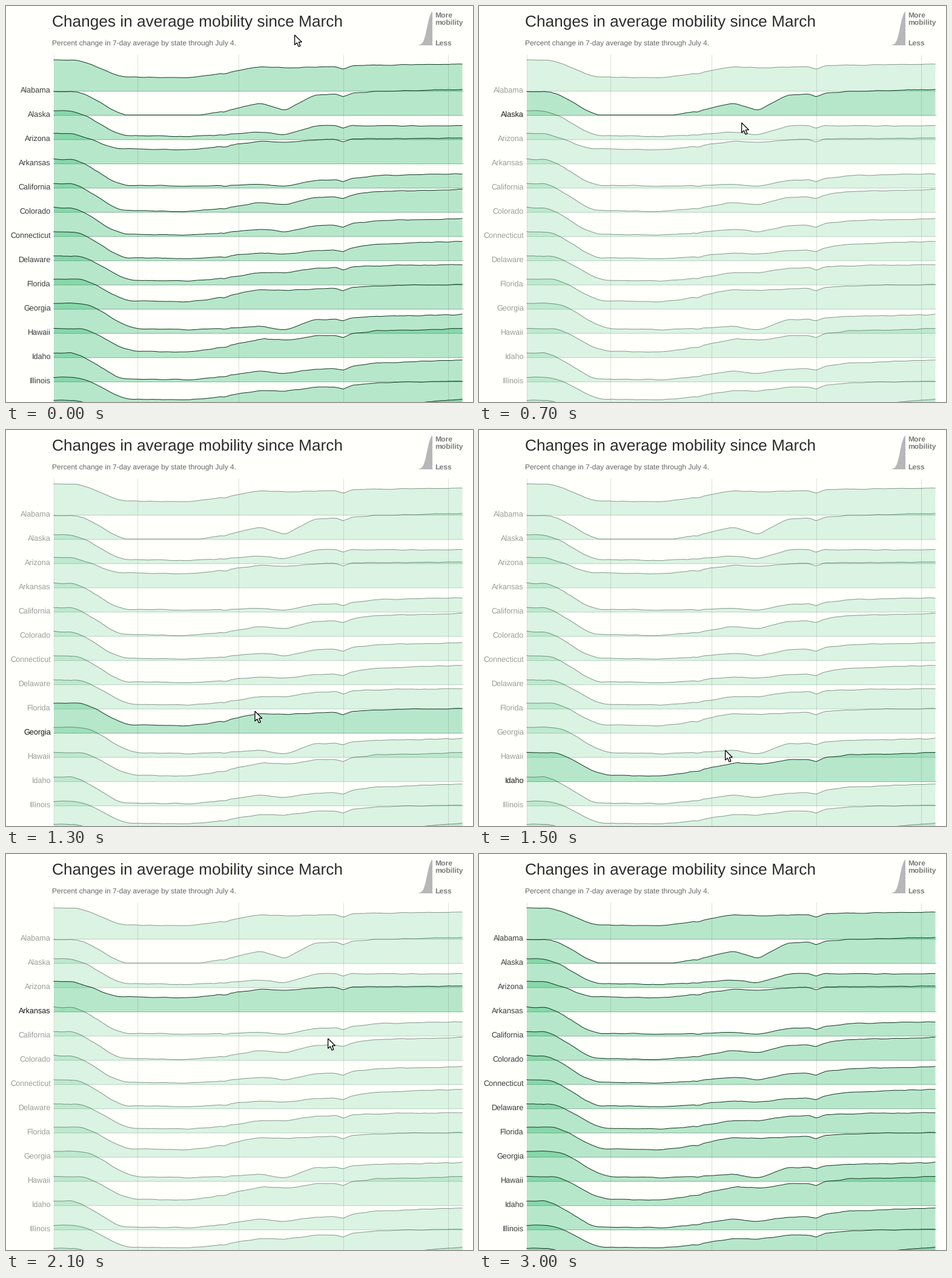
A matplotlib script that plays this animation: 771 px wide and 654 px high, repeating every 3400 ms.

```python
import numpy as np
import matplotlib.pyplot as plt
from matplotlib.animation import FuncAnimation
from matplotlib.patches import Polygon

W, H = 771, 654
FRAMES, STEP = 34, 100
LEFT, RIGHT, TOP, PITCH = 79, 753, 141, 40
GREEN, DARK = "#27b969", "#0f3d26"

plt.rcParams.update({"font.family": "Liberation Sans", "text.hinting": "none"})
fig = plt.figure(figsize=(W / 72, H / 72), dpi=72, facecolor="#fffffb")
ax = fig.add_axes([0, 0, 1, 1])
ax.set_xlim(0, W)
ax.set_ylim(H, 0)
ax.axis("off")

rng = np.random.default_rng(7)
days = np.linspace(LEFT, RIGHT, 121)
rows = []


def text(x, y, s, size, color, **kw):
    return ax.text(x, y, s, fontsize=size, color=color, va="baseline", **kw)


def smooth(y, n=3):
    return np.convolve(np.pad(y, n // 2, mode="edge"), np.ones(n) / n, "valid")


def mobility(fall, low, may, dip, june, end, start):
    """Height above the baseline: plateau, lockdown fall, slow recovery."""
    trough = low - 1.5
    spring = trough + 0.35 * (may - trough)
    summer = june + 0.7 * (end - june)
    tail = np.interp(days, [215, 300, 355, 420, 460, 510, 545, 610, 745],
                     [low, trough, spring, may, dip, june, june + 1, summer, end])
    u = np.clip((days - fall + 50) / 100, 0, 1)
    h = start + (smooth(tail) - start) * u * u * (3 - 2 * u)
    h += smooth(rng.normal(0, 0.6, days.size))
    h -= 4.5 * np.clip(1 - abs(days - 557) / 14, 0, 1)  # late May holiday
    h -= 2 * np.clip(1 - abs(days - 362) / 7, 0, 1)
    return np.maximum(h, 1)


def state(name, *shape, start=48):
    base = TOP + PITCH * len(rows)
    y = base - mobility(*shape, start)
    z = 2 + len(rows) * 0.1
    area = ax.fill_between(days, y, base, color=GREEN, lw=0, zorder=z)
    floor, = ax.plot([LEFT, RIGHT + 2], [base - 0.5] * 2, color="#7f9c8b",
                     lw=1, snap=False, zorder=z + 0.01)
    line, = ax.plot(days, y, color=DARK, lw=1.05, zorder=z + 0.02)
    label = text(74, base + 2.3, name, 12.6, "#3a3a3a", ha="right")
    label.set_visible(base < H)
    rows.append((area, floor, line, label))


# x of the fall, then heights: April, mid May, late May, June, July
state("Alabama", 156, 24, 41, 39, 40, 45, start=52)
state("Alaska", 158, 0, 21, 8, 34, 43, start=40)
state("Arizona", 153, 7, 13, 8, 23, 23)
state("Arkansas", 147, 25, 38, 36, 40, 43, start=51)
state("California", 153, 5, 7, 3, 13, 24)
state("Colorado", 151, 3, 16, 13, 25, 38)
state("Connecticut", 152, 4, 13, 8, 18, 30)
state("Delaware", 156, 5, 13, 11, 17, 32)
state("Florida", 164, 8, 21, 20, 28, 34)
state("Georgia", 163, 14, 33, 31, 34, 41, start=50)
state("Hawaii", 170, 8, 12, 5, 23, 31, start=50)
state("Idaho", 168, 11, 31, 29, 36, 48)
state("Illinois", 153, 5, 18, 14, 21, 36)
state("Indiana", 159, 12, 26, 25, 31, 42)
state("Iowa", 159, 12, 26, 25, 15, 51, start=50)

for x in (79.5, 217.5, 384.5, 557.5, 730.5):
    ax.plot([x, x], [81, H], color="#223328", alpha=0.15, lw=1, snap=False,
            zorder=5)

text(76, 35, "Changes in average mobility since March", 26.3, "#2c2c2c")
text(76.5, 66, "Percent change in 7-day average by state through July 4.", 12,
     "#666666")
for y, word in ((19, "More"), (32, "mobility"), (65, "Less")):
    text(708.5, y, word, 12.1, "#7b7b7b", weight="bold")

# Legend ridge
s = np.linspace(0, 1, 40)
rise = 1 / (1 + np.exp(9 * (0.67 - s)))
ridge = np.column_stack([677 + 27 * s, 65 - 56 * rise / rise[-1]])
ax.add_patch(Polygon(np.vstack([ridge, [704, 65]]), fc="#b7b7b7", lw=0))

ARROW = np.array([(0.6, 0.8), (0.6, 17.2), (4.4, 13.7), (7, 20), (9.9, 18.8),
                  (7.3, 12.6), (12.4, 12.6)])
cursor = Polygon(ARROW, fc="white", ec="black", lw=1.3, joinstyle="miter",
                 zorder=9)
ax.add_patch(cursor)

# Pointer stops: step, x, y
PATH = np.array([(4, 476, 47), (7, 433, 192), (10, 417, 367), (15, 406, 528),
                 (17, 428, 611), (21, 531, 304), (24, 329, 78), (28, 118, 20),
                 (29, 69, -2)])


def hovered(n):
    """Row under the pointer on its way down and back up, or None."""
    if 6 <= n < 24:
        return int(np.interp(n, [6, 10, 16, 17, 21, 23], [0, 6, 12, 12, 3, 1]))


def update(n):
    active = hovered(n)
    for i, (area, floor, line, label) in enumerate(rows):
        on = i == active
        a = 1 if on or active is None else 0.5
        area.set_alpha(0.33 * a)
        floor.set_alpha(0.6 * a)
        line.set_alpha(a)
        label.set_alpha(a)
        label.set_color("#161616" if on else "#3a3a3a")
    tip = [np.interp(n, PATH[:, 0], PATH[:, k]) for k in (1, 2)]
    cursor.set_xy(ARROW + tip)
    cursor.set_visible(n < 30)
    return []


anim = FuncAnimation(fig, update, frames=FRAMES, interval=STEP, repeat=True,
                     repeat_delay=0, blit=False)
plt.show()
```
